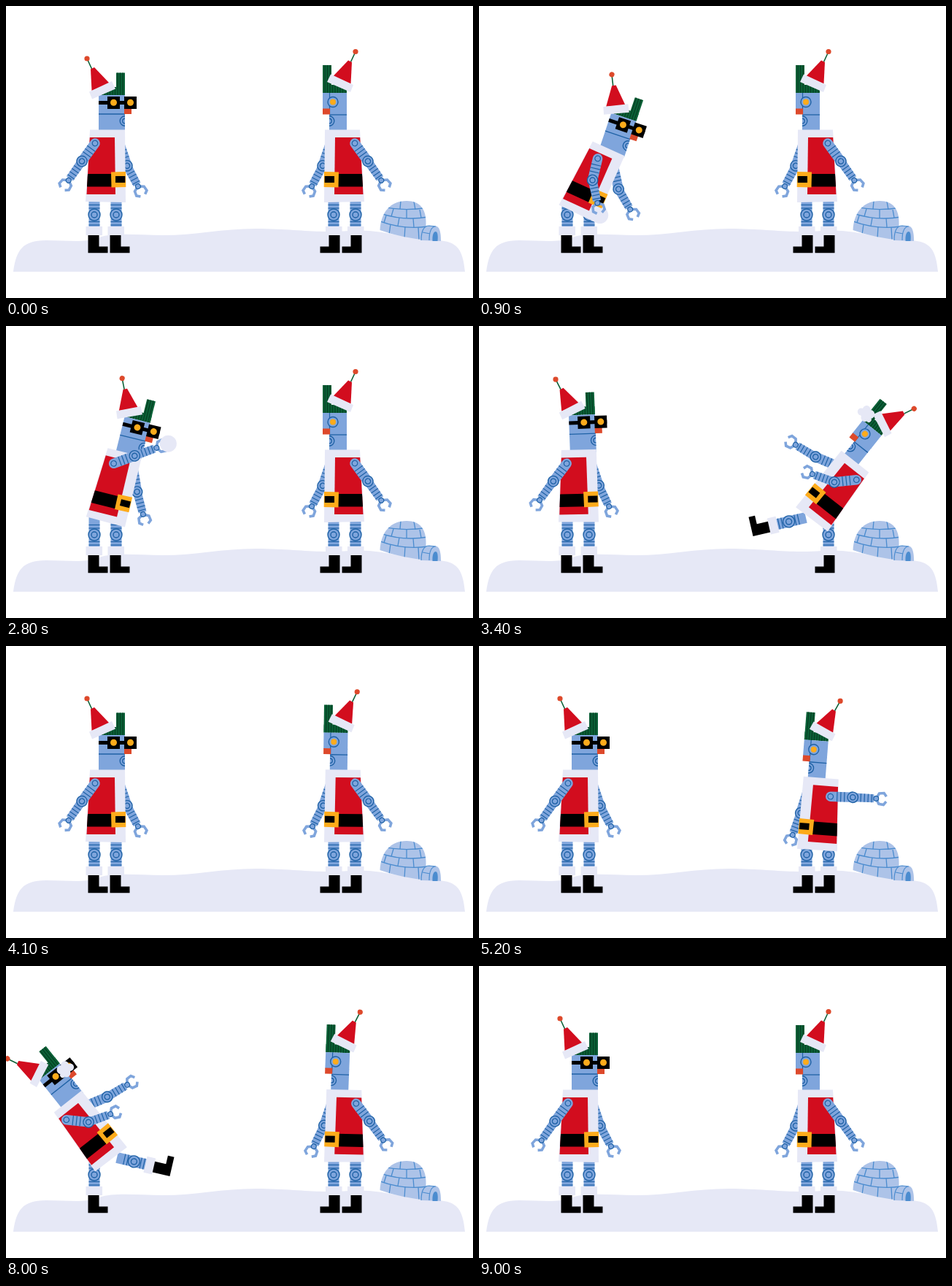
Recreate the animation shown at these times as an HTML page with a canvas. Size 640 by 400 pixels, loop 10000 ms.

```html
<!DOCTYPE html>
<html lang="en">
<head>
<meta charset="utf-8">
<title>Robot snowball fight</title>
<style>
  html, body { margin: 0; width: 100%; height: 100%; overflow: hidden; background: #fff; }
  canvas { display: block; width: 640px; height: 400px; }
</style>
</head>
<body>
<canvas id="stage"></canvas>
<script>
const LOOP = 10000, STEP = 100;
const BLUE = '#7fa5dc', LINE = '#1f62a6', SNOW = '#e6e8f6', RED = '#d20d1e', BLACK = '#000',
      GOLD = '#fdab1b', ORANGE = '#dd492b', GREEN = '#0b6137', DARK_GREEN = '#053d22';
const HIP = [136.5, 268], NECK = [138, 170], BONE = [30.5, 32], GRIP = 17;

const canvas = document.getElementById('stage');
const dpr = window.devicePixelRatio || 1;
canvas.width = 640 * dpr;
canvas.height = 400 * dpr;
const c = canvas.getContext('2d');
const rad = d => d * Math.PI / 180;

// ---- poses (robot facing right; arm angles are absolute degrees) ----
const IDLE = { dx: 0, dy: 0, lean: 0, head: 0, leg: 0, n1: 126, n2: 125, f1: 71, f2: 62, sx: 0, sy: 0 };
const pose = (p, base = IDLE) => ({ ...base, ...p });
const RISE = pose({ dy: -5, n1: 135, n2: 130 });
const SWING = pose({ dy: 11, lean: 4.5, n1: 178, n2: 177, f1: 72, f2: 70, sx: 2, sy: 6 });
const REACH = pose({ dx: -4, dy: 22, lean: -42, head: 12, n1: 95, n2: 88, f1: 80, f2: 75, sx: 14 });
const LIFT = pose({ dy: 10, lean: -7, n1: 112, n2: 68, f1: 75, f2: 45, sx: 4 });
const HOLD = pose({ n1: 40, n2: -26, f1: 46, f2: -32, sx: 12 });
const PAT = pose({ n1: 32, n2: -14, f1: 40, f2: -48 }, HOLD);
const WIND = pose({ lean: 20, head: 3, n1: -170, n2: -165, f1: 10, f2: 0 });
const FLING = pose({ lean: -14, n1: -20, n2: -20, f1: 80, f2: 75, sx: 6 });
const FOLLOW = pose({ lean: -18, dy: 3, n1: 48, n2: 40, f1: 95, f2: 90, sx: 6 });
const SETTLE = pose({ lean: 1.3, head: 0.9, n1: 127, n2: 126, f1: 71, f2: 64 });
const KNOCK = pose({ dx: 7.2, dy: -3.5, lean: 38.3, head: 0.3, leg: 77, n1: 6, n2: -20, f1: -23, f2: -31 });
const PEAK = pose({ lean: 50, n1: -8, n2: -34, f1: -36, f2: -44, leg: 88 }, KNOCK);
const RETURN = pose({ dx: 3, dy: -2, lean: 20, leg: 42, n1: 60, n2: 40, f1: 25, f2: 10 });
const SWAY = pose({ lean: -4, head: -2, n1: 118, n2: 112 });

const PREP = [[0, IDLE], [100, IDLE], [220, RISE], [400, SWING], [700, REACH], [1100, LIFT],
  [1400, HOLD], [1550, PAT], [1700, HOLD], [1850, PAT], [2000, HOLD], [2100, PAT], [2200, HOLD]];
const THROW = [[0, HOLD], [350, WIND], [500, FLING], [650, FOLLOW], [950, IDLE], [1100, SETTLE], [1300, IDLE]];
const HIT = [[0, IDLE], [200, PEAK], [300, pose({ lean: 39 }, KNOCK)], [400, KNOCK], [500, RETURN],
  [700, SWAY], [950, SETTLE], [1200, IDLE]];
const shift = (keys, start, rate = 1) => keys.map(([t, p]) => [start + t * rate, p]);

const left = {
  keys: [...shift(PREP, 0), ...shift(THROW, 2300), ...shift(HIT, 7600)],
  grab: 700, release: 2800, hit: 7600, splat: [164, 133], face: leftFace, hat: [0, 0]
};
const right = {
  keys: [...shift(HIT, 3000), ...shift(PREP, 4800), ...shift(THROW, 7000, 10 / 11)],
  grab: 5500, release: 7000 + 500 * 10 / 11, hit: 3000, splat: [168, 109], face: rightFace, hat: [10, -9.5], flip: true
};

function poseAt(keys, t) {
  const i = keys.findIndex(k => k[0] > t);
  if (i === 0) return keys[0][1];
  if (i < 0) return keys[keys.length - 1][1];
  const [t0, a] = keys[i - 1], [t1, b] = keys[i];
  const u = (t - t0) / (t1 - t0), e = u * u * (3 - 2 * u), out = {};
  for (const k in a) out[k] = a[k] + (b[k] - a[k]) * e;
  return out;
}

function turn([x, y], [px, py], deg) {
  const s = Math.sin(rad(deg)), k = Math.cos(rad(deg));
  return [px + (x - px) * k - (y - py) * s, py + (x - px) * s + (y - py) * k];
}
function bodyPoint(p, pt) {
  const [x, y] = turn(pt, HIP, -p.lean);
  return [x + p.dx, y + p.dy];
}
const along = ([x, y], deg, d) => [x + Math.cos(rad(deg)) * d, y + Math.sin(rad(deg)) * d];
const shoulder = p => bodyPoint(p, [122 + p.sx, 188 + p.sy]);
const grip = p => along(along(shoulder(p), p.n1, BONE[0]), p.n2, BONE[1] + GRIP);

// ---- drawing helpers ----
function rect(x0, y0, x1, y1, fill) {
  c.fillStyle = fill;
  c.fillRect(x0, y0, x1 - x0, y1 - y0);
}
function poly(fill, ...pts) {
  c.beginPath();
  pts.forEach(([x, y]) => c.lineTo(x, y));
  c.closePath();
  c.fillStyle = fill;
  c.fill();
}
function line(color, width, ...pts) {
  c.beginPath();
  pts.forEach(([x, y], i) => i ? c.lineTo(x, y) : c.moveTo(x, y));
  c.strokeStyle = color;
  c.lineWidth = width;
  c.stroke();
}
function disc(x, y, r, fill, stroke, width = 1.4) {
  c.beginPath();
  c.arc(x, y, r, 0, 2 * Math.PI);
  if (fill) { c.fillStyle = fill; c.fill(); }
  if (stroke) { c.strokeStyle = stroke; c.lineWidth = width; c.stroke(); }
}
function group(draw) {
  c.save();
  draw();
  c.restore();
}
function spin([x, y], deg) {
  c.translate(x, y);
  c.rotate(rad(deg));
  c.translate(-x, -y);
}
function joint(x, y, r) {
  disc(x, y, r, BLUE, LINE);
  disc(x, y, r * .5, null, LINE);
}

// ---- scene ----
function ground() {
  c.beginPath();
  c.moveTo(10, 364);
  c.bezierCurveTo(14, 335, 22, 321, 55, 321);
  c.bezierCurveTo(85, 321, 108, 325, 128, 317);
  c.bezierCurveTo(148, 310, 180, 314, 215, 314);
  c.bezierCurveTo(262, 314, 300, 304, 350, 305);
  c.bezierCurveTo(400, 306, 425, 311, 470, 308);
  c.bezierCurveTo(520, 305, 545, 320, 590, 321);
  c.bezierCurveTo(620, 322, 626, 335, 629, 364);
  c.fillStyle = SNOW;
  c.fill();
}

function igloo() {
  const edge = '#4b8ccf', wall = '#adc3e8';
  group(() => {
    c.beginPath();
    c.moveTo(512.5, 307);
    c.bezierCurveTo(514, 282, 527, 267, 549, 267);
    c.bezierCurveTo(568, 267, 577, 279, 575.5, 302);
    c.lineTo(578, 321);
    c.quadraticCurveTo(540, 317, 512.5, 307);
    c.fillStyle = wall;
    c.fill();
    c.clip();
    c.strokeStyle = edge;
    c.lineWidth = 1.3;
    c.beginPath();
    for (const [y0, ym, y1] of [[274, 282, 276], [283, 295, 289], [294, 307, 302]]) {
      c.moveTo(510, y0);
      c.quadraticCurveTo(544, ym, 578, y1);
    }
    c.stroke();
    const bricks = [[541, 267, 540, 278], [559, 268, 561, 279], [531, 278, 528, 288], [549, 279, 549, 291],
      [567, 279, 569, 290], [521, 287, 518, 297], [539, 290, 537, 301], [558, 291, 559, 303],
      [527, 299, 525, 313], [547, 302, 546, 318], [565, 303, 566, 321]];
    bricks.forEach(([a, b, d, e]) => line(edge, 1.3, [a, b], [d, e]));
  });
  c.beginPath();
  c.moveTo(569, 321);
  c.bezierCurveTo(569, 308, 573, 301, 580, 301);
  c.lineTo(590, 301.5);
  c.bezierCurveTo(595, 304, 596, 312, 596, 322);
  c.closePath();
  c.fillStyle = wall;
  c.fill();
  c.strokeStyle = edge;
  c.lineWidth = 1.2;
  c.beginPath();
  c.moveTo(569, 321);
  c.bezierCurveTo(569, 308, 573, 301, 580, 301);
  c.lineTo(589, 302);
  c.moveTo(580, 321);
  c.bezierCurveTo(580, 309, 583, 302, 589, 302);
  c.moveTo(571, 310);
  c.lineTo(581, 312);
  c.stroke();
  c.beginPath();
  c.moveTo(584.5, 322);
  c.bezierCurveTo(584, 313, 586, 309, 589, 309);
  c.bezierCurveTo(592, 310, 592, 316, 591.5, 322);
  c.fillStyle = edge;
  c.fill();
}

// ---- robot parts ----
function leg(x, top) {
  rect(x - 7.5, top, x + 7.5, 303, BLUE);
  for (const y of [272.5, 277, 295.5, 300]) line(LINE, 1.2, [x - 7.5, y], [x + 7.5, y]);
  joint(x, 286, 8);
  rect(x - 11.5, 302, x + 11, 314, SNOW);
  poly(BLACK, [x - 8.5, 314], [x + 6.5, 314], [x + 6.5, 329.5], [x + 18.5, 329.5], [x + 18.5, 338.3], [x - 8.5, 338.3]);
}

function arm(from, a1, a2) {
  const elbow = along(from, a1, BONE[0]);
  group(() => {
    c.translate(...from);
    c.rotate(rad(a1));
    c.lineCap = 'round';
    line(BLUE, 13.5, [0, 0], [BONE[0], 0]);
    c.lineCap = 'butt';
    for (const x of [9, 14, 19]) line(LINE, 1.2, [x, -6.7], [x, 6.7]);
    disc(0, 0, 3.8, null, LINE, 1.2);
  });
  group(() => {
    c.translate(...elbow);
    c.rotate(rad(a2));
    const w = BONE[1];
    poly(BLUE, [0, -6], [w - 3, -5.5], [w - 3, 5.5], [0, 6]);
    for (const x of [11, 16, 21, 26]) line(LINE, 1.2, [x, -5.6], [x, 5.6]);
    for (const s of [-1, 1])
      line(BLUE, 3.6, [w + 1, 2 * s], [w + 4, 7.2 * s], [w + 10.5, 8 * s], [w + 14, 3.5 * s]);
    disc(w, 0, 3.4, BLUE, LINE, 1.2);
    joint(0, 0, 7.2);
  });
}

function coat() {
  poly(SNOW, [115, 169.5], [163, 169.5], [164, 269], [109, 268]);
  poly(RED, [114.8, 180], [149, 180], [150, 258], [110.5, 258]);
  poly(BLACK, [112, 230], [147, 230], [147, 247.5], [111, 247.5]);
  poly(GOLD, [144, 227.5], [164, 227], [164.3, 248], [144.5, 248.5]);
  rect(150, 233, 163.3, 242, BLACK);
}

function hair(x0, x1, top, base) {
  rect(x0, base - 11, x1, base, GREEN);
  rect(x1 - 12, top, x1, base, GREEN);
  for (let x = x1 - 3; x > x0; x -= 3.5)
    line(DARK_GREEN, 1.2, [x, x > x1 - 12 ? top : base - 11], [x, base]);
}

function hat([x, y]) {
  group(() => {
    c.translate(x, y);
    line(GREEN, 1.6, [117.5, 86], [111, 72]);
    disc(111, 72, 3.6, ORANGE);
    poly(RED, [116, 86.5], [121, 84], [142, 106], [117.5, 116]);
    poly(SNOW, [145, 103], [114, 117.5], [118, 127.5], [150, 113.5]);
  });
}

function mouth(x, x0) {
  group(() => {
    c.beginPath();
    c.rect(x0, 148, x - x0, 20);
    c.clip();
    disc(x, 157.5, 6.8, null, LINE);
    disc(x, 157.5, 3.3, null, LINE);
  });
}

function leftFace() {
  hair(130, 163, 91.5, 122);
  rect(127, 122, 163, 174, BLUE);
  line(LINE, 1.3, [127, 148], [163, 148]);
  mouth(163, 127);
  rect(162, 140, 172, 148, ORANGE);
  rect(127, 130, 179, 135, BLACK);
  for (const x of [147.5, 170.5]) {
    rect(x - 8.5, 124, x + 8.5, 141, BLACK);
    disc(x, 132.3, 4.5, GOLD);
  }
}

function rightFace() {
  hair(133, 166, 81, 119);
  rect(133, 119, 166, 142, BLUE);
  rect(133, 141, 157, 174, BLUE);
  line(LINE, 1.2, [156.5, 119], [156.5, 148]);
  line(LINE, 1.3, [133, 149], [157, 149]);
  mouth(157, 133);
  rect(156, 140.5, 166, 148.5, ORANGE);
  disc(152, 131.5, 7, BLUE, LINE);
  disc(152, 131.5, 4, GOLD);
}

function splat([x, y], age) {
  const k = Math.max(0, (age - 450) / 350);
  if (age < 0 || k >= 1) return;
  group(() => {
    c.translate(x, y + 60 * k * k);
    c.scale(1 - k * .6, 1 - k * .6);
    for (const [a, b, r] of [[-5, -3, 6], [3, -5, 5.5], [7, 2, 5], [-2, 5, 5.5], [1, 0, 7], [-8, 4, 3.5]])
      disc(a, b, r, SNOW);
  });
}

function robot(bot, t) {
  const p = poseAt(bot.keys, t);
  const hipY = 262 + Math.max(0, p.dy) / 3;
  group(() => {
    if (bot.flip) { c.translate(600, 0); c.scale(-1, 1); }
    if (t >= bot.grab && t < bot.release) disc(...grip(p), 11.5, SNOW);
    arm(bodyPoint(p, [156, 190]), p.f1, p.f2);
    leg(121, hipY);
    group(() => {
      c.translate(p.leg / 77, p.leg / 154);
      spin([151, 262], -p.leg);
      leg(151, hipY);
    });
    group(() => {
      c.translate(p.dx, p.dy);
      spin(HIP, -p.lean);
      group(() => {
        spin(NECK, -p.head);
        bot.face();
        hat(bot.hat);
        splat(bot.splat, t - bot.hit);
      });
      coat();
    });
    arm(shoulder(p), p.n1, p.n2);
  });
}

function flight(from, to, t) {
  if (t < from.release || t >= to.hit) return;
  const u = (t - from.release) / (to.hit - from.release);
  const [x0, y0] = grip(poseAt(from.keys, from.release));
  const x1 = 600 - to.splat[0], y1 = to.splat[1];
  const x = x0 + (x1 - x0) * u, y = y0 + (y1 - y0) * u - 40 * u * (1 - u);
  disc(from.flip ? 600 - x : x, y, 11.5, SNOW);
}

function draw(ms) {
  const t = Math.floor(ms % LOOP / STEP) * STEP;
  c.setTransform(dpr, 0, 0, dpr, 0, 0);
  c.fillStyle = '#fff';
  c.fillRect(0, 0, 640, 400);
  ground();
  igloo();
  robot(left, t);
  robot(right, t);
  flight(left, right, t);
  flight(right, left, t);
}

const start = performance.now();
function tick() {
  draw(performance.now() - start);
  requestAnimationFrame(tick);
}
tick();
</script>
</body>
</html>
```
